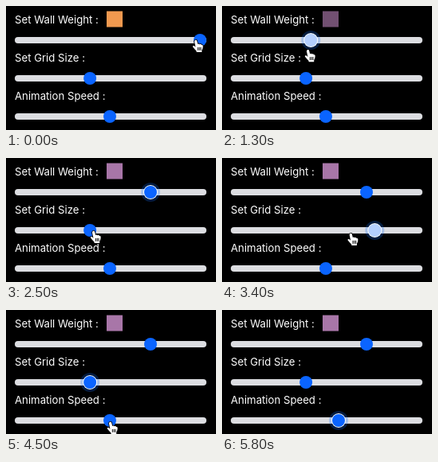
An HTML page with a canvas for the animation above (5.9 s loop, 263x156 px).

```html
<!DOCTYPE html>
<html lang="en">
<head>
<meta charset="utf-8">
<title>Range sliders</title>
<style>
  html, body { margin: 0; width: 100%; height: 100%; overflow: hidden; background: #000; }
  canvas { display: block; width: 263px; height: 156px; }
</style>
</head>
<body>
<canvas id="stage"></canvas>
<script>
const W = 263, H = 156, LOOP = 5900, STEP = 100, FADE = 150;
const MIN_X = 19, RANGE = 224, NOTCH = RANGE / 13, RADIUS = 8;
const BLUE = [10, 100, 255], PALE = [179, 207, 254], PURPLE = [168, 118, 168];

const canvas = document.getElementById('stage');
const ctx = canvas.getContext('2d');
const dpr = window.devicePixelRatio || 1;
canvas.width = W * dpr;
canvas.height = H * dpr;

const move = (from, to, ...pos) => ({ from, to, pos });

const sliders = [
  { label: 'Set Wall Weight :', y: 43, press: 50, release: 1740, blur: 2500,
    start: [243], moves: [move(100, 1000, 88), move(1100, 1700, 181)] },
  { label: 'Set Grid Size :', y: 91, press: 2500, release: 3800, blur: 4550, notched: true,
    start: [105], moves: [move(2600, 3100, 191), move(3400, 3700, 105)] },
  { label: 'Animation Speed :', y: 139, press: 4550, release: 5640, blur: LOOP,
    start: [130], moves: [move(4700, 5000, 85), move(5100, 5700, 146)] }
];

const pointer = {
  start: [234, 42],
  hide: 5800,
  moves: [
    move(100, 1000, 79, 53), move(1100, 1700, 179, 58),    // drag the first thumb
    move(1700, 2300, 106, 95), move(2300, 2500, 106, 91),
    move(2600, 3100, 187, 94), move(3200, 3700, 102, 94),  // drag the second
    move(3800, 4500, 127, 140),
    move(4700, 5000, 82, 138), move(5100, 5700, 220, 140)  // drag the third
  ]
};

const hand = new Path2D(
  'M3.4 1.2C4.3 .3 5.5 .8 5.8 1.9L6.8 6C7.5 5.1 8.8 5.3 9.1 6.3' +
  'C9.9 5.6 11 6 11.2 7C12.2 6.6 12.9 7.3 12.9 8.3C12.9 10.5 12.5 11.8 11.6 13.3' +
  'L11.5 15.8H5.4L5.1 14.1C3.7 12.9 2.5 11.2 1.1 9.6C.1 8.3 1.6 7.3 2.7 8.2' +
  'L4.2 9.5L2.9 3.3C2.7 2.5 2.8 1.8 3.4 1.2Z');
const creases = new Path2D('M6.9 10.1V13.2M8.7 10V13.2M10.4 10V13.2');

const clamp = v => Math.max(0, Math.min(1, v));
const ease = p => (1 - Math.cos(Math.PI * p)) / 2;
const blend = (a, b, p) => a.map((v, i) => v + (b[i] - v) * p);
const rgb = c => `rgb(${c.map(Math.round).join(',')})`;

const place = ({ start, moves }, t) => moves.reduce(
  (at, m) => blend(at, m.pos, ease(clamp((t - m.from) / (m.to - m.from)))), start);

// Amount of a state that fades in at one time and out at another
const between = (t, on, off) => clamp((t - on) / FADE) - clamp((t - off) / FADE);

function thumbX(s, t) {
  const [x] = place(s, t);
  return s.notched ? MIN_X + Math.round((x - MIN_X) / NOTCH) * NOTCH : x;
}

function disc(x, y, r, fill) {
  ctx.fillStyle = fill;
  ctx.beginPath();
  ctx.arc(x, y, r, 0, Math.PI * 2);
  ctx.fill();
}

function drawSlider(s, t) {
  const x = thumbX(s, t), focus = between(t, s.press, s.blur);
  ctx.fillStyle = '#fff';
  ctx.fillText(s.label, 11, s.y - 21);
  ctx.fillStyle = '#dcdde1';
  ctx.beginPath();
  ctx.roundRect(11, s.y - 4, 240, 8, 4);
  ctx.fill();
  if (focus > 0) {
    disc(x, s.y, RADIUS + 4 * focus, `rgba(13,110,253,${0.25 * focus})`);
    disc(x, s.y, RADIUS + focus, `rgba(255,255,255,${focus})`);
  }
  disc(x, s.y, RADIUS, rgb(blend(BLUE, PALE, between(t, s.press, s.release))));
}

function drawSwatch(weight) {
  const level = 0.25 + 1.04 * weight;
  ctx.fillStyle = weight >= 1 ? '#f2994f' : rgb(PURPLE.map(v => v * level));
  ctx.fillRect(126, 6.5, 20, 20);
}

function drawPointer(x, y) {
  ctx.save();
  ctx.translate(x - 1, y);
  ctx.scale(1.06, 1.02);
  ctx.lineJoin = ctx.lineCap = 'round';
  ctx.strokeStyle = '#000';
  ctx.lineWidth = 1.6;
  ctx.stroke(hand);
  ctx.fillStyle = '#fff';
  ctx.fill(hand);
  ctx.lineWidth = 0.9;
  ctx.stroke(creases);
  ctx.restore();
}

function draw(t) {
  ctx.setTransform(dpr, 0, 0, dpr, 0, 0);
  ctx.fillStyle = '#000';
  ctx.fillRect(0, 0, W, H);
  ctx.font = '13.2px Inter, "Liberation Sans", sans-serif';
  sliders.forEach(s => drawSlider(s, t));
  drawSwatch((thumbX(sliders[0], t) - MIN_X) / RANGE);
  if (t < pointer.hide) drawPointer(...place(pointer, t));
}

// The picture advances in discrete ticks
function tick() {
  const t = performance.now() % LOOP;
  draw(Math.floor(t / STEP) * STEP);
  requestAnimationFrame(tick);
}
tick();
</script>
</body>
</html>
```
